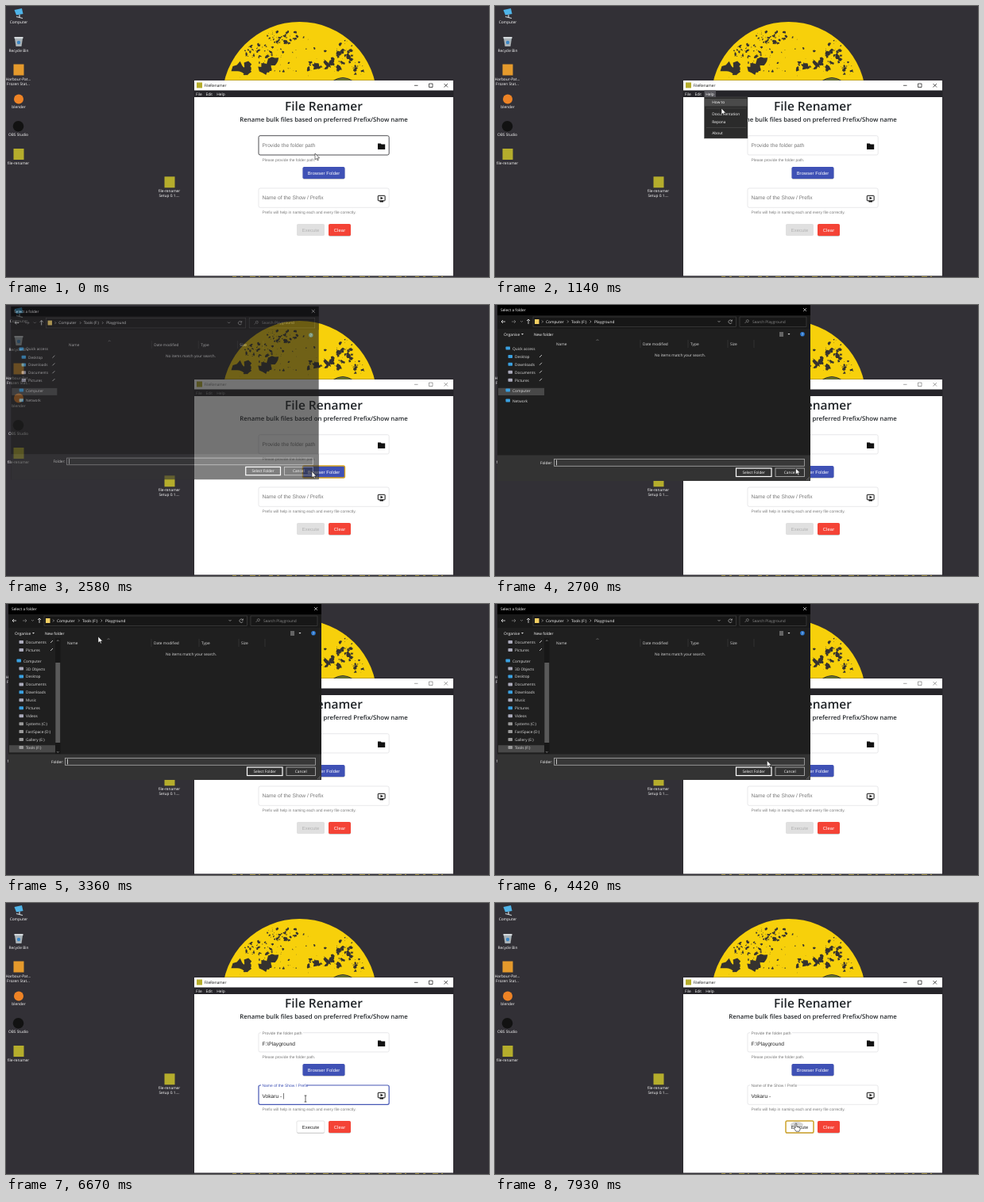
Write an HTML page that moves like this. It is 608 px wide and 342 px high and loops after 7.99 s.

```html
<!DOCTYPE html>
<html lang="en">
<head>
<meta charset="utf-8">
<title>File Renamer</title>
<style>
  html, body { margin: 0; width: 100%; height: 100%; overflow: hidden; background: #323036; }
  svg { display: block; width: 100vw; height: 100vh; }
  text { font: 4.8px "Open Sans", sans-serif; white-space: pre; text-rendering: geometricPrecision; }
  .form text { font: 6.65px "Liberation Sans", Arial, sans-serif; }
  .form .help { font-size: 4.95px; fill: #7b7b7b; }
  .form .button { font-size: 5.8px; letter-spacing: .1px; text-anchor: middle; }
  .form .title { font: 600 15.5px "Open Sans", sans-serif; text-anchor: middle; fill: #212529; }
  .form .subtitle { font: 600 7.8px "Open Sans", sans-serif; text-anchor: middle; fill: #212529; }
  .mid { text-anchor: middle; }
</style>
</head>
<body>
<svg id="stage" viewBox="0 0 608 342"></svg>
<script>
const LOOP = 7990;
const $ = id => document.getElementById(id);
const rect = (x, y, w, h, fill, extra = '') =>
  `<rect x="${x}" y="${y}" width="${w}" height="${h}" fill="${fill}" ${extra}/>`;
const text = (x, y, s, fill = '#fff', extra = '') =>
  `<text x="${x}" y="${y}" fill="${fill}" ${extra}>${s}</text>`;
const line = (d, color = '#fff', width = .6, extra = '') =>
  `<path d="${d}" fill="none" stroke="${color}" stroke-width="${width}" ${extra}/>`;
const shape = (d, fill, extra = '') => `<path d="${d}" fill="${fill}" ${extra}/>`;
const circle = (x, y, r, fill) => `<circle cx="${x}" cy="${y}" r="${r}" fill="${fill}"/>`;
const group = (id, body, extra = '') => `<g id="${id}" ${extra}>${body}</g>`;

let seed = 11;
const random = () => (seed = seed * 16807 % 2147483647) / 2147483647;

function moon() {
  // center, radii, number of craters, largest crater
  const clusters = [
    [298, 80, 10, 12, 11, 8], [330, 77, 14, 9, 11, 9], [322, 58, 22, 10, 45, 2.5], [348, 38, 20, 10, 45, 2],
    [400, 77, 22, 11, 22, 4.5], [426, 58, 12, 16, 40, 3], [443, 78, 8, 10, 18, 3], [370, 62, 45, 28, 30, 1.4]
  ];
  let craters = '';
  for (const [cx, cy, rx, ry, count, largest] of clusters) {
    for (let i = 0; i < count; i++) {
      const angle = random() * 6.283, far = Math.sqrt(random());
      const x = cx + Math.cos(angle) * far * rx, y = cy + Math.sin(angle) * far * ry;
      const size = .35 + largest * random() ** 2;
      const points = Array.from({ length: 9 }, (_, k) => {
        const r = size * (.35 + random());
        return `${(x + r * Math.cos(k * .7)).toFixed(1)} ${(y + r * Math.sin(k * .7)).toFixed(1)}`;
      });
      craters += `M${points.join('L')}Z`;
    }
  }
  return circle(369.5, 117.3, 97.3, '#f7d00b') + shape(craters, '#35322f') +
    shape('M411 95Q424 86 437 95Z', '#6f7a2c', 'stroke="#35322f"');
}

function desktop() {
  const label = (x, y, s) => text(x, y, s, '#fff', 'class="mid"');
  const tile = (x, y, color) => rect(x - 6.5, y - 7, 13, 14, color);
  const bottom = line('M285 341.6H560', '#a8933a', .9, 'stroke-dasharray="5 5 3 9 7 4 2 11"');
  return moon() + bottom +
    shape('M10.5 5L20 3L21.5 10L13 11.5Z', '#4fb4e8') + line('M13 13.5L21 15.5M17 11V14', '#cfd6da', 1.2) +
    label(16, 22, 'Computer') +
    shape('M11 41H21L19.5 51H12.5Z', '#a9b2b7') + rect(10.5, 39, 11, 2, '#d5dadd') +
    circle(16, 46, 2.2, '#3c86c4') + label(16, 58.3, 'Recycle Bin') +
    tile(16, 80.5, '#e59a2c') + label(15.5, 94, 'Harbour-Pat...') + label(15.5, 100, 'Frozen Stat...') +
    circle(16, 117.5, 6, '#ee8325') + label(16, 129, 'blender') +
    circle(15.5, 151.7, 6.8, '#121212') + label(15.5, 164, 'OBS Studio') +
    tile(16, 187, '#b5ad2c') + label(15.5, 199.5, 'file-renamer') +
    tile(206, 222.3, '#b5ad2c') + label(205.5, 235, 'file-renamer') + label(205.5, 241.2, 'Setup 0.1....');
}

const field = (id, y, label, help) =>
  rect(318, y, 164.2, 24.3, '#fff', `id="${id}Border" rx="2"`) +
  rect(321, y - 1.5, label.length * 2.25 + 1, 3, '#fff', `id="${id}Notch"`) +
  text(322.5, 0, label, '#777', `id="${id}Label"`) +
  text(322.5, y + 16, '', '#222', `id="${id}Value"`) +
  text(322.5, y + 32, help, '#777', 'class="help"');

const button = (id, x, y, w, label, fill, color) =>
  rect(x, y + .7, w, 15, '#000', `id="${id}Shadow" rx="1.8" opacity=".25"`) +
  rect(x, y, w, 15, fill, `id="${id}" rx="1.8"`) +
  text(x + w / 2, y + 9.6, label, color, `id="${id}Text" class="button"`);

function appWindow() {
  const chrome = rect(236.5, 93.5, 327, 247.5, '#1c1b1f', 'opacity=".5"') +
    rect(237, 94, 326, 246.5, '#fff') + rect(237, 106.5, 326, 8.5, '#252429') +
    rect(240, 96.5, 7, 7, '#b5ad2c') +
    group('caption', text(249.5, 102.3, 'FileRenamer', '#111') +
      line('M514 100.3H518.5M532.5 98H537V102.5H532.5ZM551.5 98L556 102.5M556 98L551.5 102.5', '#111', .7)) +
    rect(263.5, 106.5, 14.5, 8.5, '#55545a', 'id="helpTab"') +
    group('menuBar', text(239, 112.7, 'File') + text(251.5, 112.7, 'Edit') + text(265.3, 112.7, 'Help'));
  const form =
    text(400, 131.7, 'File Renamer', '', 'class="title"') +
    text(400, 146.4, 'Rename bulk files based on preferred Prefix/Show name', '', 'class="subtitle"') +
    field('path', 163.7, 'Provide the folder path', 'Please provide the folder path.') +
    shape('M468 173.4H471.6L472.7 174.6H477.2V181H468Z', '#111') +
    button('browse', 373.5, 203, 53, 'Browser Folder', '#3f51b5', '#fff') +
    field('show', 230, 'Name of the Show / Prefix', 'Prefix will help in naming each and every file correctly.') +
    rect(468.3, 239.3, 8.8, 6.5, 'none', 'stroke="#111" stroke-width="1" rx=".6"') +
    shape('M471.5 240.7L475 242.5L471.5 244.3ZM470.5 246H475V247.4H470.5Z', '#111') +
    text(322.5, 246, 'Name of the show', '#b5b5b5', 'id="placeholder"') +
    rect(0, 240, .6, 7.5, '#222', 'id="caret"') +
    button('execute', 366, 275, 35, 'Execute', '#e0e0e0', '#b0b0b0') +
    '<ellipse id="ripple" cx="380" cy="280" ry="4" fill="#777" opacity=".3"/>' +
    button('clear', 406, 275, 28, 'Clear', '#f44336', '#fff');
  const menu = rect(263.5, 115, 54.5, 52, '#2b2b2b', 'stroke="#555" stroke-width=".5"') +
    rect(264, 117, 53.5, 9.5, '#4a4a4a', 'id="menuHover"') +
    line('M266 129H316M266 153.5H316', '#555', .5) +
    [['How to', 123.3], ['Documentation', 137.8], ['Repona', 147.8], ['About', 162]]
      .map(([name, y]) => text(273.3, y, name)).join('');
  return chrome + group('form', form, 'class="form"') + group('menu', menu);
}

function dialog() {
  const soft = '#dedede';
  const entry = ([name, y, color, x = 25, pinned]) =>
    rect(x - 8.5, y - 4, 5.5, 4, color, 'rx=".7"') + text(x, y, name, soft) +
    (pinned ? line(`M56 ${y - 1}L59 ${y - 4}`, '#bbb', 1) : '');
  const blue = '#3aa0e0', grey = '#aab', pinned = [undefined, true];
  const before = [
    ['Quick access', 56.5, blue, 22], ['Desktop', 67, blue, ...pinned], ['Downloads', 76.8, blue, ...pinned],
    ['Documents', 86.8, grey, ...pinned], ['Pictures', 96.8, grey, ...pinned],
    ['Computer', 109.5, blue, 22], ['Network', 122.5, blue, 22]
  ];
  const names = ['3D Objects', 'Desktop', 'Documents', 'Downloads', 'Music', 'Pictures', 'Videos',
    'Systems (C:)', 'FastSpace (D:)', 'Gallery (E:)', 'Tools (F:)'];
  const after = [['Documents', 50, grey, ...pinned], ['Pictures', 60, grey, ...pinned], ['Computer', 73.5, blue, 22],
    ...names.map((name, i) => [name, 83.5 + i * 9.95, i > 6 ? '#999' : i % 2 ? blue : grey])];
  const frame = rect(3, 0, 394, 222, '#1f1f1f') + rect(3, 0, 394, 13, '#000') + rect(3, 13, 394, 17, '#191919') +
    text(7, 8.3, 'Select a folder') + line('M388 4L392 8M392 4L388 8') +
    line('M13 21H8M10 19L8 21L10 23M42 24V18M40 20L42 18L44 20', '#eee', .8) +
    line('M21 21H26M24 19L26 21L24 23M32 20L33.5 21.5L35 20', '#888', .7) +
    rect(48, 15, 255.5, 12.5, '#171717', 'stroke="#484848" stroke-width=".6"') +
    rect(50, 18, 5.5, 6, '#f3cf62') +
    line('M59 19.5L60.5 21L59 22.5M91 19.5L92.5 21L91 22.5M119.5 19.5L121 21L119.5 22.5M280.5 20L282 21.5L283.5 20', '#ccc') +
    text(64, 22.8, 'Computer') + text(96, 22.8, 'Tools (F:)') + text(125, 22.8, 'Playground') +
    line('M298 20A2.2 2.2 0 1 0 298.2 22M298.4 18.5V20.4H296.5', '#ccc') +
    rect(308, 15, 84, 12.5, '#171717', 'stroke="#484848" stroke-width=".6"') +
    line('M314.5 23L316.5 21A1.5 1.5 0 1 1 317 21.5', '#999') + text(324, 22.8, 'Search Playground', '#8a8a8a') +
    circle(387, 36.7, 2.8, '#2c78d0') + text(387, 38.5, '?', '#fff', 'class="mid"');
  const toolbar = text(11, 38.5, 'Organise') + text(49, 38.5, 'New folder') +
    shape('M33 36H36L34.5 37.8ZM368.5 36H371.5L370 37.8Z', '#ddd') +
    line('M358 35H363M358 37H363M358 39H363', '#ccc', .8);
  const list = line('M183 44V54M243 44V54M293 44V54M326 44V54', '#444', .5) +
    line('M127.5 45L129 43.5L130.5 45', '#aaa', .5) +
    text(77, 50.5, 'Name', soft) + text(186, 50.5, 'Date modified', soft) + text(246, 50.5, 'Type', soft) +
    text(296, 50.5, 'Size', soft) + text(233, 65, 'No items match your search.', soft, 'class="mid"');
  const scrolled = rect(4, 178.2, 58, 9.2, '#484848') + after.map(entry).join('') +
    rect(62, 43, 6.5, 146, '#171717') + rect(62.3, 74, 5.9, 101, '#5a5a5a') +
    line('M64 47L65.3 45.5L66.6 47M64 186L65.3 187.5L66.6 186', '#aaa');
  const footer = rect(3, 189.5, 394, 32.5, '#333') + text(57, 200.5, 'Folder:') +
    rect(74.5, 194.5, 315, 8.8, '#383838', 'stroke="#aaa" stroke-width=".8"') +
    rect(77, 195.5, .7, 6.8, '#fff', 'id="folderCaret"') +
    rect(303.5, 206, 44.5, 10.5, '#333', 'stroke="#fff" stroke-width="1.2"') +
    text(325.7, 213, 'Select Folder', '#fff', 'class="mid"') +
    rect(353, 206, 36.5, 10.5, '#333', 'stroke="#aaa" stroke-width=".9"') +
    text(371.2, 213, 'Cancel', '#fff', 'class="mid"') + line('M392 221L396 217M394 221L396 219', '#888');
  return frame + group('toolbar', toolbar) + list +
    group('sideStart', rect(4, 104.8, 58, 9.2, '#484848') + before.map(entry).join('')) +
    group('sideScrolled', scrolled) + footer;
}

const cursors =
  group('arrow', shape('M0 0V8L1.9 6.3L3.1 9L4.4 8.4L3.2 5.9H5.6Z', '#fff', 'stroke="#111" stroke-width=".55"')) +
  group('beam', line('M-1.4 -4H1.4M0 -4V4M-1.4 4H1.4', '#222', .7)) +
  group('hand', shape('M-1 5V0a.9.9 0 0 1 1.8 0V3.3L4.4 4.2Q5.4 5 5 7L4 9.2H0L-2.6 5.6Q-2.4 4.4-1 5Z', '#fff',
    'stroke="#111" stroke-width=".6"'));

$('stage').innerHTML = rect(0, 0, 608, 342, '#323036') + desktop() + appWindow() +
  group('dialog', dialog()) + group('cursor', cursors);

const clamp = v => Math.max(0, Math.min(1, v));
const ramp = (t, start, length) => clamp((t - start) / length);
const ease = p => p * p * (3 - 2 * p);
const within = (t, start, end) => t >= start && t < end;
const show = (id, on) => { $(id).style.display = on ? '' : 'none'; };
const set = (id, attributes) => {
  for (const name in attributes) $(id).setAttribute(name, attributes[name]);
};

const path = [
  [0, 389, 186], [780, 271, 110], [960, 271, 110], [1140, 285, 129], [1400, 287, 158], [1560, 271, 110],
  [1740, 271, 110], [2340, 385, 210], [2640, 385, 210], [3300, 116, 41], [3420, 116, 41], [3660, 400, 150],
  [4240, 400, 150], [4500, 326, 211], [4620, 326, 211], [4860, 377, 247], [6990, 377, 247],
  [7350, 379, 279], [LOOP, 379, 279]
];
const phrase = 'Vokaru - ';
const keyTimes = [5380, 5500, 5620, 5800, 5920, 6040, 6420, 6540, 6670];

function pointer(t) {
  const i = path.findIndex(([time]) => time > t);
  const [t0, x0, y0] = path[i - 1], [t1, x1, y1] = path[i];
  const p = ease((t - t0) / (t1 - t0));
  return [x0 + (x1 - x0) * p, y0 + (y1 - y0) * p];
}

function drawField(id, top, floated, focused, hovered) {
  set(id + 'Label', { y: top + 14.4 - 12.6 * floated, fill: focused ? '#3f51b5' : '#777' });
  $(id + 'Label').style.fontSize = 6.65 - 1.67 * floated + 'px';
  set(id + 'Notch', { opacity: floated });
  set(id + 'Border', {
    stroke: focused ? '#4657b4' : hovered ? '#3c3c40' : '#d9d9dc',
    'stroke-width': focused ? 1.2 : hovered ? .9 : .6
  });
}

function render(t) {
  const [x, y] = pointer(t);
  const menuOpen = within(t, 800, 1600);
  const dialogOpen = within(t, 2500, 4680);
  const focused = within(t, 4860, 7870);
  const inside = (left, top, w, h) => x > left && x < left + w && y > top && y < top + h;
  const free = !menuOpen && !dialogOpen;

  show('menu', menuOpen);
  show('helpTab', menuOpen);
  set('menuHover', { y: y < 131 ? 117 : y < 142 ? 131.5 : y < 153 ? 141.5 : 155.5 });
  show('menuHover', y > 115);
  set('caption', { opacity: dialogOpen ? .55 : 1 });
  set('menuBar', { opacity: dialogOpen ? .55 : 1 });

  const opacity = ramp(t, 2500, 130) * (1 - ramp(t, 4560, 120));
  const scale = .955 + .045 * opacity;
  show('dialog', dialogOpen);
  set('dialog', { opacity, transform: `translate(200 111) scale(${scale}) translate(-200 -111)` });
  show('toolbar', t >= 2700);
  show('sideStart', t < 2820);
  show('sideScrolled', t >= 2820);
  show('folderCaret', Math.floor((t - 2360) / 500) % 2 === 0);

  const typed = keyTimes.filter(time => time <= t).length;
  $('pathValue').textContent = t >= 4600 ? 'F:\\Playground' : '';
  $('showValue').textContent = phrase.slice(0, typed);
  drawField('path', 164, ramp(t, 4540, 150), false, free && inside(318, 164, 164, 24));
  drawField('show', 230, ramp(t, 4860, 180), focused, free && inside(318, 230, 164, 24));
  show('placeholder', focused && !typed);
  set('placeholder', { opacity: ramp(t, 4900, 150) });

  const blinkStart = typed ? keyTimes[typed - 1] : 4860;
  show('caret', focused && Math.floor((t - blinkStart) / 500) % 2 === 0);
  set('caret', { x: 322.5 + (typed ? $('showValue').getComputedTextLength() : 0) });

  const clicked = t >= 7870;
  set('browse', { stroke: within(t, 2340, 2640) ? '#d9a520' : 'none', 'stroke-width': 1.4 });
  show('executeShadow', typed > 0);
  set('execute', {
    fill: typed ? '#fff' : '#e0e0e0',
    stroke: clicked ? '#cda32b' : typed ? '#d6d6d6' : 'none',
    'stroke-width': clicked ? 1.5 : .6
  });
  set('executeText', { fill: typed ? '#222' : '#b0b0b0' });
  show('ripple', clicked);
  set('ripple', { rx: 4 + 4 * ramp(t, 7870, 60) });

  const beam = free && (inside(320, 167, 145, 18) || inside(320, 233, 145, 18));
  const hand = free && (inside(373, 203, 53, 15) || (typed && inside(366, 275, 35, 15)));
  set('cursor', { transform: `translate(${x} ${y})` });
  show('beam', beam);
  show('hand', hand);
  show('arrow', !beam && !hand);
}

function tick() {
  render(performance.now() % LOOP);
  requestAnimationFrame(tick);
}
tick();
</script>
</body>
</html>
```
